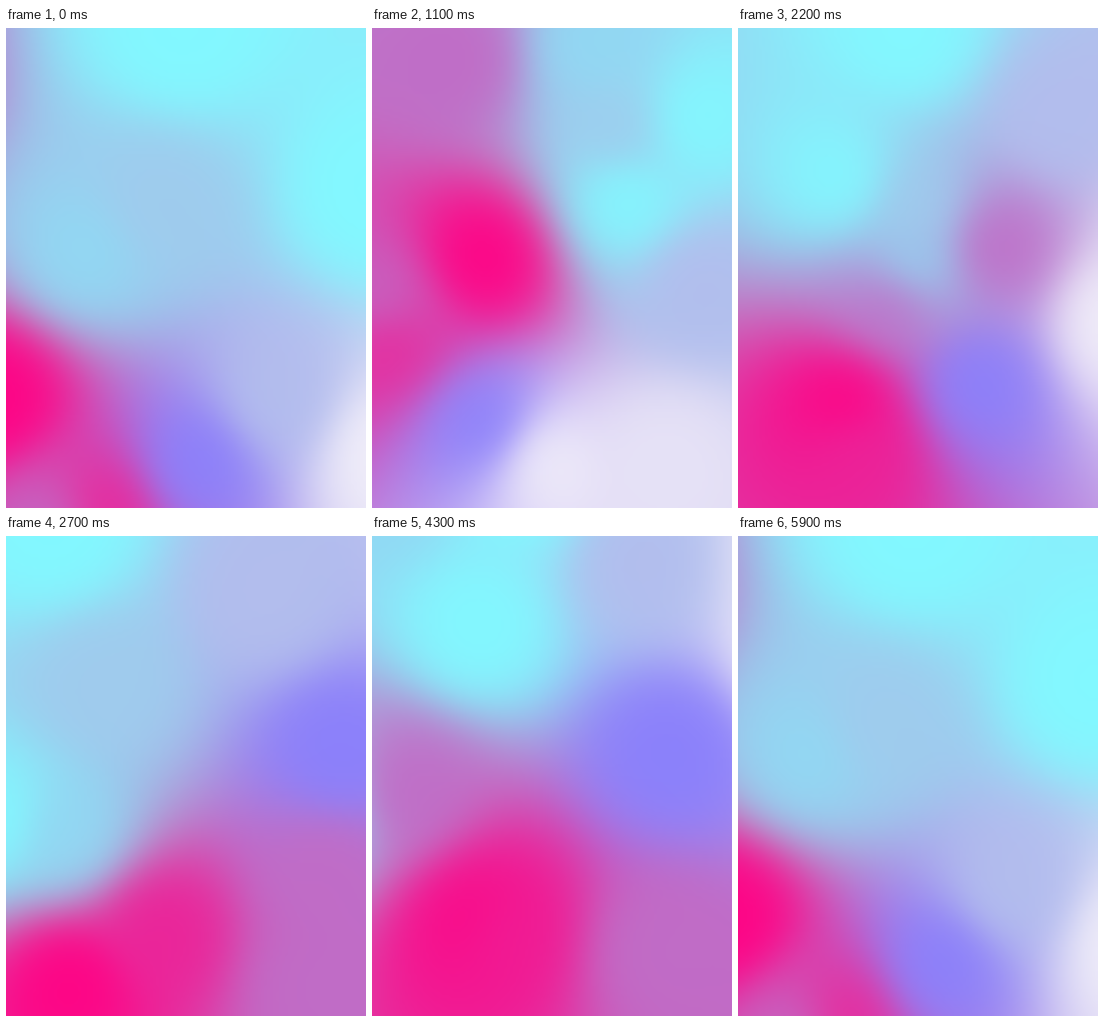
Animation, 360 px wide and 480 px high, one loop 6000 ms. Source, as an HTML page with a canvas:

```html
<!DOCTYPE html>
<html lang="en">
<head>
<meta charset="utf-8">
<title>Flowing gradient</title>
<style>
html, body { margin: 0; width: 100%; height: 100%; overflow: hidden; background: #9dcfee; }
canvas { display: block; width: 360px; height: 480px; }
</style>
</head>
<body>
<canvas id="stage" width="360" height="480"></canvas>
<script>
const WIDTH = 360, HEIGHT = 480, LOOP = 6000, STEP = 100;
const CELL = 3;       // the field is soft, so it is computed coarsely and smoothed up
const SOFTNESS = 48;  // radius of the flat core of each colour

const keyTimes = [0, 700, 1700, 2700, 3500, 4900];

const blob = (hex, ...path) => ({
  rgb: [1, 3, 5].map(i => parseInt(hex.slice(i, i + 2), 16)),
  path
});

// Each colour drifts along a closed path with one stop per key time.
const blobs = [
  blob('#82f8ff', [175, 5], [215, 212], [280, 58], [50, -5], [50, 125], [150, 48]),
  blob('#82f8ff', [364, 165], [350, 165], [245, 8], [-10, 285], [120, 10], [185, -40]),
  blob('#ff0284', [-12, 370], [68, 232], [152, 280], [65, 445], [165, 288], [45, 460]),
  blob('#eb2398', [95, 485], [-5, 262], [72, 430], [155, 395], [125, 430], [118, 380]),
  blob('#8a80fb', [190, 435], [128, 340], [130, 472], [335, 215], [242, 188], [330, 260]),
  blob('#f1eef9', [380, 425], [208, 398], [198, 452], [540, 120], [352, 108], [510, 150]),
  blob('#e6e2f6', [460, 520], [310, 455], [320, 375], [560, 60], [345, 38], [520, 60]),
  blob('#9fcbed', [150, 180], [230, 50], [240, 200], [100, 150], [-40, 215], [-15, 290]),
  blob('#b2bded', [270, 370], [290, 325], [365, 135], [260, 60], [215, 20], [300, 70]),
  blob('#91d8f3', [80, 225], [165, 0], [266, 120], [60, 300], [0, -20], [45, 0]),
  blob('#c06cc6', [50, 500], [30, 410], [10, 130], [310, 450], [330, 400], [240, 440]),
  blob('#c06cc6', [-140, 60], [40, 20], [140, 90], [320, 340], [20, 330], [50, 190])
];

const count = keyTimes.length;
const wrap = i => (i + count) % count;
const timeAt = i => keyTimes[wrap(i)] + Math.floor(i / count) * LOOP;

function slope(path, i, axis) {
  const rise = path[wrap(i + 1)][axis] - path[wrap(i - 1)][axis];
  return rise / (timeAt(i + 1) - timeAt(i - 1));
}

// Periodic cubic Hermite curve through the stops.
function position(path, time) {
  let i = count - 1;
  while (keyTimes[i] > time) i--;
  const span = timeAt(i + 1) - timeAt(i);
  const u = (time - timeAt(i)) / span;
  const u2 = u * u, u3 = u2 * u;
  return [0, 1].map(axis =>
    (2 * u3 - 3 * u2 + 1) * path[i][axis] +
    (u3 - 2 * u2 + u) * span * slope(path, i, axis) +
    (3 * u2 - 2 * u3) * path[wrap(i + 1)][axis] +
    (u3 - u2) * span * slope(path, wrap(i + 1), axis));
}

const context = document.getElementById('stage').getContext('2d');
const field = document.createElement('canvas');
field.width = WIDTH / CELL;
field.height = HEIGHT / CELL;
const fieldContext = field.getContext('2d');
const image = fieldContext.createImageData(field.width, field.height);

function draw(time) {
  const points = blobs.map(({ rgb, path }) => {
    const [x, y] = position(path, time);
    return { x, y, rgb };
  });
  let offset = 0;
  for (let row = 0; row < field.height; row++) {
    for (let column = 0; column < field.width; column++) {
      const x = (column + 0.5) * CELL, y = (row + 0.5) * CELL;
      let red = 0, green = 0, blue = 0, total = 0;
      for (const point of points) {
        const dx = x - point.x, dy = y - point.y;
        const reach = dx * dx + dy * dy + SOFTNESS * SOFTNESS;
        const weight = 1 / (reach * reach);
        red += weight * point.rgb[0];
        green += weight * point.rgb[1];
        blue += weight * point.rgb[2];
        total += weight;
      }
      image.data[offset++] = red / total;
      image.data[offset++] = green / total;
      image.data[offset++] = blue / total;
      image.data[offset++] = 255;
    }
  }
  fieldContext.putImageData(image, 0, 0);
  context.imageSmoothingEnabled = true;
  context.imageSmoothingQuality = 'high';
  context.drawImage(field, 0, 0, WIDTH, HEIGHT);
}

const start = performance.now();
let shown = -1;

function tick() {
  const elapsed = Math.max(0, performance.now() - start) % LOOP;
  const time = Math.floor(elapsed / STEP) * STEP;
  if (time !== shown) {
    shown = time;
    draw(time);
  }
  requestAnimationFrame(tick);
}
tick();
</script>
</body>
</html>
```
